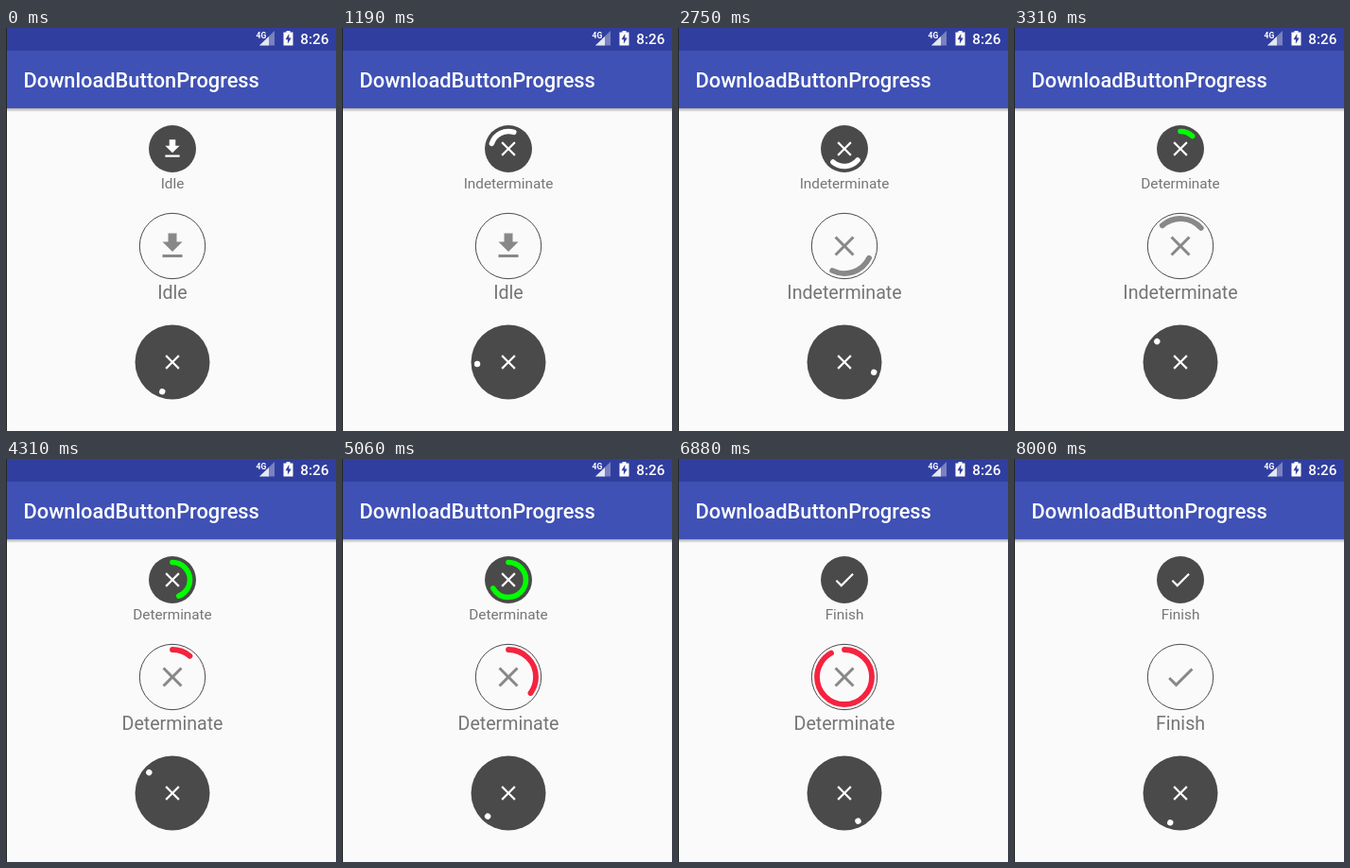
An HTML page that plays this animation: 349 px wide and 427 px high, repeating every 8060 ms.

```html
<!DOCTYPE html>
<html lang="en">
<head>
<meta charset="utf-8">
<title>Download buttons</title>
<style>
  html, body { margin: 0; width: 100%; height: 100%; overflow: hidden; background: #fafafa; }
  svg { display: block; width: 349px; height: 427px; }
  text { font-family: Roboto, "Noto Sans", sans-serif; }
  .bar { fill: #fff; font-weight: 500; }
  .label { fill: #757575; text-anchor: middle; }
  .arc { fill: none; stroke-linecap: round; }
</style>
</head>
<body>
<svg id="stage" viewBox="0 0 349 427">
  <defs>
    <linearGradient id="shade" x2="0" y2="1">
      <stop stop-color="#000" stop-opacity=".32"/>
      <stop offset="1" stop-color="#000" stop-opacity="0"/>
    </linearGradient>
  </defs>
  <rect width="349" height="427" fill="#fafafa"/>
  <rect y="85" width="349" height="4" fill="url(#shade)"/>
  <rect y="24" width="349" height="61" fill="#3f51b5"/>
  <rect width="349" height="24" fill="#303f9f"/>
  <rect width="1" height="427" fill="#262626"/>

  <text class="bar" x="264.5" y="10.5" font-size="8.5" style="font-weight:700" textLength="auto">4G</text>
  <path d="M268 18.5H284V3z" fill="#fff" opacity=".35"/>
  <path d="M268 18.5H278V9z" fill="#fff" opacity=".8"/>
  <path d="M293.5 4.5h3V3h4v1.500h3V18.500h-10z" fill="#fff"/>
  <path d="M299.300 6l-3.800 6.300h2.400v4.500l3.800-6.300h-2.400z" fill="#303f9f"/>
  <text class="bar" x="311.300" y="17" font-size="15.300">8:26</text>
  <text class="bar" x="18.500" y="63" font-size="21.800">DownloadButtonProgress</text>
</svg>
<script>
const LOOP = 8060, STEP = 62.5;
const CX = 176, SPIN = 0.36;
const WAIT = 2000, TICK = 31.6;

const ICONS = {
  idle: 'M19 9h-4V3H9v6H5l7 7 7-7zM5 18v2h14v-2H5z',
  close: 'M19 6.41L17.59 5 12 10.59 6.41 5 5 6.41 10.59 12 5 17.59 6.41 19 12 13.41 17.59 19 19 17.59 13.41 12z',
  done: 'M9 16.17L4.83 12l-1.42 1.41L9 19 21 7l-1.41-1.41z'
};

const stage = document.getElementById('stage');

function add(tag, attrs) {
  const el = document.createElementNS('http://www.w3.org/2000/svg', tag);
  set(el, attrs);
  stage.append(el);
  return el;
}

function set(el, attrs) {
  for (const key in attrs) el.setAttribute(key, attrs[key]);
}

function makeButton(o) {
  add('circle', { cx: CX, cy: o.cy, r: o.r, fill: o.fill, stroke: o.edge || 'none' });
  const icon = add('path', {
    fill: o.ink,
    transform: `translate(${CX} ${o.cy}) scale(${o.scale}) translate(-12 -12)`
  });
  const arc = add('circle', {
    class: 'arc', cx: CX, cy: o.cy, r: o.track, 'stroke-width': o.width, pathLength: 360
  });
  const label = add('text', { class: 'label', x: CX, y: o.base, 'font-size': o.size });

  // Angles run clockwise from twelve o'clock.
  function drawArc(from, sweep, color) {
    set(arc, {
      stroke: color,
      'stroke-dasharray': `${sweep} 360`,
      transform: `rotate(${from - 90} ${CX} ${o.cy})`,
      visibility: sweep > 0 ? 'visible' : 'hidden'
    });
  }

  function show(shape, text) {
    icon.setAttribute('d', ICONS[shape]);
    label.textContent = text;
  }

  return t => {
    const age = t - o.start;
    const percent = Math.floor((age - WAIT) / TICK);
    if (age < 0) {
      show('idle', 'Idle');
      drawArc(0, 0, 'none');
    } else if (age < WAIT) {
      show('close', 'Indeterminate');
      drawArc(190 + age * SPIN, 90, o.ink);
    } else if (percent < 100) {
      show('close', 'Determinate');
      drawArc(0, percent * 3.6, o.progress);
    } else {
      show('done', 'Finish');
      drawArc(0, 0, 'none');
    }
  };
}

function makeSpinner(cy) {
  add('circle', { cx: CX, cy, r: 39.5, fill: '#4a4a4a' });
  add('path', {
    d: ICONS.close, fill: '#fff',
    transform: `translate(${CX} ${cy}) scale(1.09) translate(-12 -12)`
  });
  const dot = add('circle', { cx: CX, cy: cy - 33, r: 3.2, fill: '#fff' });
  return t => set(dot, { transform: `rotate(${199 + t * SPIN} ${CX} ${cy})` });
}

const parts = [
  makeButton({
    cy: 128, r: 25, fill: '#4a4a4a', ink: '#fff', progress: '#00ff00',
    scale: 1.09, track: 18.5, width: 5.6, base: 169.5, size: 15.3, start: 915
  }),
  makeButton({
    cy: 231, r: 34.7, fill: '#fafafa', edge: '#4a4a4a', ink: '#888', progress: '#f5233f',
    scale: 1.5, track: 29, width: 5.8, base: 287, size: 19.6, start: 1955
  }),
  makeSpinner(354)
];

const origin = performance.now();

function render() {
  const now = (performance.now() - origin) % LOOP;
  // The picture advances sixteen times a second.
  const t = Math.min(128, Math.floor((now + 5) / STEP)) * STEP;
  parts.forEach(draw => draw(t));
  requestAnimationFrame(render);
}
render();
</script>
</body>
</html>
```
